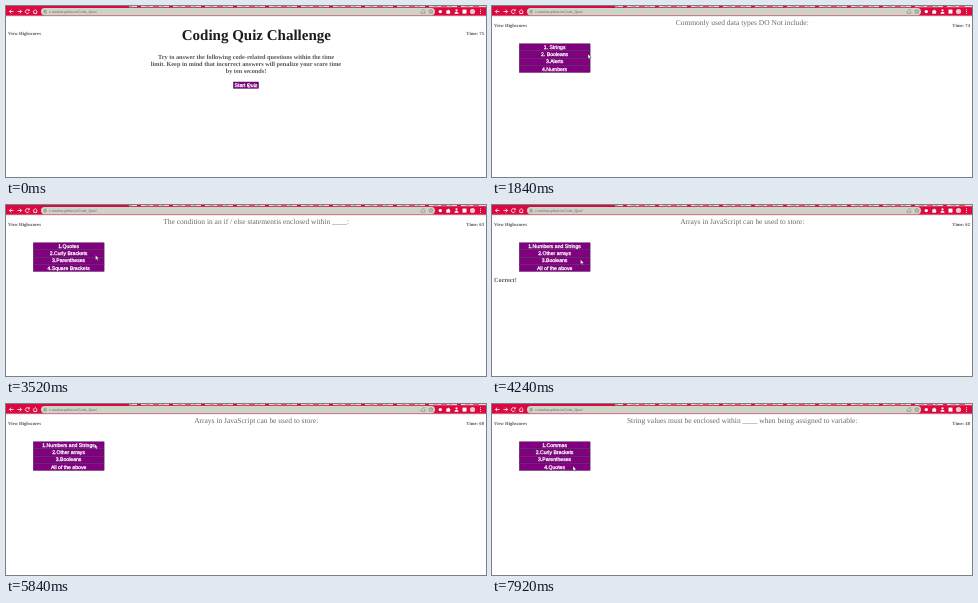
Write an HTML page that moves like this. It is 480 px wide and 171 px high and loops after 8 s.

```html
<!DOCTYPE html>
<html lang="en">
<head>
<meta charset="utf-8">
<title>Coding Quiz</title>
<style>
html, body { margin: 0; width: 100%; height: 100%; overflow: hidden; background: #fff; }
svg { display: block; width: 480px; height: 171px; text-rendering: geometricPrecision; }
text { font-family: "Liberation Serif", "Times New Roman", serif; fill: #555; white-space: pre; }
.mid { text-anchor: middle; }
.h1 { font-size: 15px; font-weight: bold; fill: #1c1c1c; }
.intro, .note { font-size: 6.25px; font-weight: bold; }
.side { font-size: 4.68px; font-weight: bold; }
.ask { font-size: 7.49px; fill: #6a6a6a; }
.btn rect { fill: #800080; stroke: #4a2050; stroke-width: .5; }
.btn text { font: 5.15px "Liberation Sans", Arial, sans-serif; fill: #fff; stroke: #fff; stroke-width: .28; text-anchor: middle; }
.url { font: 3.5px "Liberation Sans", Arial, sans-serif; fill: #666; }
.line { fill: none; stroke: #fff; stroke-width: .8; }
.dark { fill: none; stroke: #7a7f78; stroke-width: .6; }
</style>
</head>
<body>
<svg viewBox="0 0 480 171">
  <g id="chrome">
    <rect width="480" height="9.8" fill="#dc0840"/>
    <rect x="123" width="357" height="1.2" fill="#f0dcd2"/>
    <g id="tabs"></g>
    <rect y="9.6" width="480" height=".6" fill="#c98a96"/>
    <rect x="35" y="2" width="394" height="7.2" rx="3.6" fill="#ccd4c8"/>
    <path class="line" d="M7.5 5.5H3.5M5.3 3.6L3.4 5.5L5.3 7.4M11.5 5.5H15.5M13.7 3.6L15.6 5.5L13.7 7.4"/>
    <path class="line" d="M23 4.4A2 2 0 1 0 23.2 6.4M23.3 3.2V4.8H21.8"/>
    <path class="line" d="M27 5.7L29.2 3.5L31.4 5.7M27.8 5.4V7.5H30.6V5.4"/>
    <path class="dark" d="M38 5.2H40.2V7H38ZM38.5 5V4.3Q39.1 3.4 39.7 4.3V5"/>
    <text class="url" x="43" y="6.8">v-marlow.github.io/Code_Quiz/</text>
    <path class="dark" d="M415.2 5V7.3H418.8V5M416 4.6Q416.5 3.7 418.8 3.8"/>
    <path class="dark" d="M424.9 3.3L425.5 4.8L427.1 4.9L425.9 5.9L426.3 7.4L424.9 6.6L423.5 7.4L423.9 5.9L422.7 4.9L424.3 4.8Z"/>
    <g fill="#fff">
      <circle cx="434.3" cy="5.6" r="1.7"/>
      <path d="M440.3 4.5H441.6Q442.3 2.6 443 4.5H444V5.5Q445.5 6 444 6.6V7.8H440.3Z"/>
      <circle cx="450.5" cy="4.3" r="1.1"/>
      <path d="M448.6 7.7V6.7Q450.5 5 452.4 6.7V7.7Z"/>
      <rect x="456.5" y="3.6" width="4" height="4"/>
      <circle cx="466.5" cy="5.5" r="2.6" fill="#efc6cf"/>
      <circle cx="474.5" cy="3.7" r=".55"/><circle cx="474.5" cy="5.5" r=".55"/><circle cx="474.5" cy="7.3" r=".55"/>
    </g>
  </g>
  <text id="scores" class="side" x="2">View Highscores</text>
  <text id="timer" class="side" x="478" text-anchor="end"></text>
  <g id="start">
    <text class="h1 mid" x="250.3" y="34">Coding Quiz Challenge</text>
    <text class="intro mid" x="240" y="53">Try to answer the following code-related questions within the time</text>
    <text class="intro mid" x="240" y="60.2">limit. Keep in mind that incorrect answers will penalize your score time</text>
    <text class="intro mid" x="240" y="67.3">by ten seconds!</text>
    <g class="btn"><rect x="227.4" y="76" width="25.2" height="6.3"/><text x="240" y="81">Start Quiz</text></g>
  </g>
  <g id="quiz">
    <text id="ask" class="ask mid" x="250.2" y="19.2"></text>
    <g id="answers"></g>
    <text id="note" class="note" x="2" y="77"></text>
  </g>
  <path id="cursor" d="M0 0V4.6L1.1 3.7L1.8 5.3L2.6 4.9L1.9 3.4H3.3Z" fill="#fff" stroke="#222" stroke-width=".3"/>
</svg>
<script>
const LOOP = 8000, STEP = 80, FIRST_TICK = 1720, NOTE_TIME = 1000;
const $ = id => document.getElementById(id);
const svg = (name, attrs, parent) => {
  const el = document.createElementNS("http://www.w3.org/2000/svg", name);
  for (const key in attrs) el.setAttribute(key, attrs[key]);
  return parent.appendChild(el);
};

// Each question opens with the click that answers the one before it.
const questions = [
  { at: 720, note: "", ask: "Commonly used data types DO Not include:",
    answers: ["1. Strings", "2. Booleans", "3.Alerts", "4.Numbers"] },
  { at: 2240, note: "Wrong!", ask: "The condition in an if / else statementis enclosed within ____:",
    answers: ["1.Quotes", "2.Curly Brackets", "3.Parentheses", "4.Square Brackets"] },
  { at: 4120, note: "Correct!", ask: "Arrays in JavaScript can be used to store:",
    answers: ["1.Numbers and Strings", "2.Other arrays", "3.Booleans", "All of the above"] },
  { at: 6480, note: "Wrong!", ask: "String values must be enclosed within ____ when being assigned to variable:",
    answers: ["1.Commas", "2.Curly Brackets", "3.Parentheses", "4.Quotes"] }
];

// time, x, y of the pointer tip
const path = [
  [0, 241, 77], [880, 241, 77], [1680, 96, 48], [1920, 96, 48], [2200, 91, 48],
  [2800, 91, 48], [3440, 89.5, 50.2], [3600, 89.5, 50.2], [4000, 88.5, 54.5],
  [5040, 88.5, 54.5], [5680, 88.7, 40], [7120, 88, 40], [7760, 81, 62], [8000, 81, 62]
];

const labels = [0, 1, 2, 3].map(i => {
  const y = 37.8 + i * 7.2;
  const g = svg("g", { class: "btn" }, $("answers"));
  svg("rect", { x: 27.3, y, width: 70.8, height: 7 }, g);
  return svg("text", { x: 62.6, y: y + 5.2 }, g);
});

// Sliver of the tab strip along the top edge
const tabColours = ["#9db67c", "#e0526e", "#cf9a8c", "#dc0840"];
for (let i = 0; i < 44; i++) {
  svg("rect", { x: 123 + i * 8, y: 0, width: 3 + i * 5 % 4, height: 1.2, fill: tabColours[i * 7 % 4] }, $("tabs"));
}

function pointer(t) {
  const i = path.findIndex(p => p[0] > t);
  const [t0, x0, y0] = path[i - 1], [t1, x1, y1] = path[i];
  const p = (t - t0) / (t1 - t0), e = p * p * (3 - 2 * p);
  return [x0 + (x1 - x0) * e, y0 + (y1 - y0) * e];
}

function timeLeft(t) {
  if (t < FIRST_TICK) return 75;
  const ticks = Math.floor((t - FIRST_TICK) / 1000);
  const lastTick = FIRST_TICK + ticks * 1000;
  const wrong = questions.filter(q => q.note === "Wrong!" && q.at <= lastTick).length;
  return 74 - ticks - 10 * wrong;
}

function draw(t) {
  const q = questions.filter(q => q.at <= t).pop();
  $("start").style.display = q ? "none" : "";
  $("quiz").style.display = q ? "" : "none";
  for (const id of ["scores", "timer"]) $(id).setAttribute("y", q ? 21.4 : 29.4);
  $("timer").textContent = "Time: " + timeLeft(t);
  if (q) {
    $("ask").textContent = q.ask;
    labels.forEach((label, i) => label.textContent = q.answers[i]);
    $("note").textContent = t < q.at + NOTE_TIME ? q.note : "";
  }
  $("cursor").setAttribute("transform", `translate(${pointer(t)})`);
}

const begin = performance.now();
function frame() {
  const t = (performance.now() - begin) % LOOP;
  draw(Math.floor(t / STEP) * STEP);
  requestAnimationFrame(frame);
}
frame();
</script>
</body>
</html>
```
